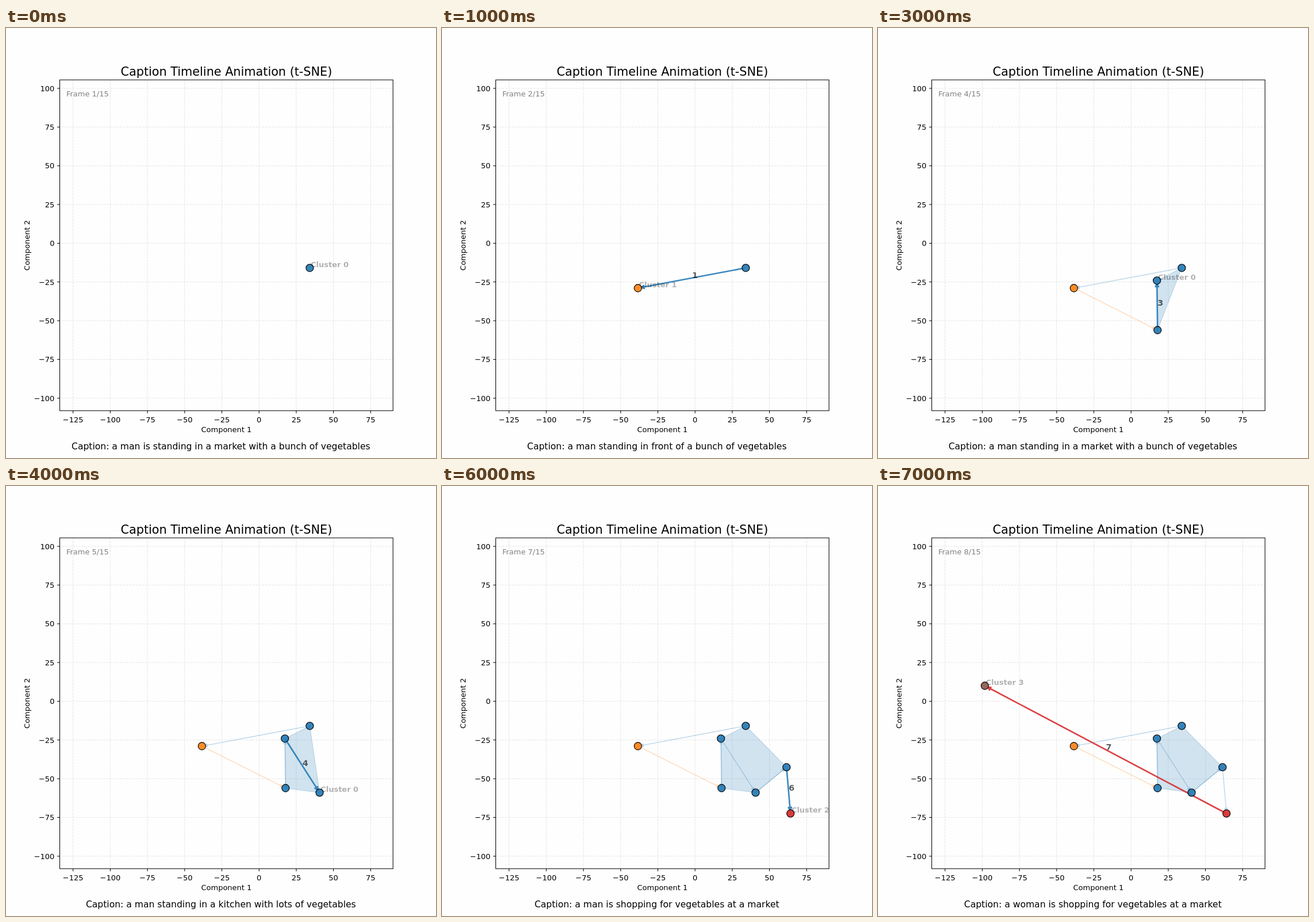
These frames come from a looping animation (748 by 748 pixels, 8 s). An HTML page:

```html
<!DOCTYPE html>
<html lang="en">
<head>
<meta charset="utf-8">
<title>Caption timeline</title>
<style>
  html, body { margin: 0; width: 100%; height: 100%; overflow: hidden; background: #fefefe; }
  svg { display: block; width: 748px; height: 748px; font: 12.99px "DejaVu Sans", sans-serif; }
</style>
</head>
<body>
<svg id="chart" viewBox="0 0 748 748">
  <g id="axes"></g>
  <g id="plot"></g>
</svg>
<script>
const STEP = 1000;
const PT = 1.2986; // pixels per typographic point
const BOX = { left: 93.5, right: 673.2, top: 90.3, bottom: 665.7 };
const COLORS = ['#1f77b4', '#ff7f0e', '#d62728', '#8c564b'];
const HULL_ORDER = [0, 5, 4, 2, 3];

// x, y, cluster, caption
const points = [
  [528.4, 417.3, 0, 'a man is standing in a market with a bunch of vegetables'],
  [340.8, 452.5, 1, 'a man standing in front of a bunch of vegetables'],
  [486.3, 525.5, 0, 'a man is standing in front of a bunch of vegetables'],
  [485.2, 439.3, 0, 'a man standing in a market with a bunch of vegetables'],
  [545.5, 533.4, 0, 'a man standing in a kitchen with lots of vegetables'],
  [599.3, 489.2, 0, 'a man in a kitchen preparing vegetables for sale'],
  [606.2, 569.7, 2, 'a man is shopping for vegetables at a market'],
  [185.8, 347.5, 3, 'a woman is shopping for vegetables at a market'],
].map(([x, y, cluster, caption]) => ({ x, y, color: COLORS[cluster], cluster, caption }));

const text = (x, y, str, attrs = '') => `<text x="${x}" y="${y}" ${attrs}>${str}</text>`;
const path = (d, attrs) => `<path d="${d}" ${attrs}/>`;
const middle = 'text-anchor="middle"';

function drawAxes() {
  let grid = '', ticks = '', labels = '';
  const minus = v => String(v).replace('-', '\u2212');
  for (let v = -125; v <= 75; v += 25) {
    const x = 440.2 + v * 2.5885;
    grid += `M${x} ${BOX.bottom}V${BOX.top}`;
    ticks += `M${x} ${BOX.bottom}v4.5`;
    labels += text(x, 685.5, minus(v), middle);
  }
  for (let v = -100; v <= 100; v += 25) {
    const y = 374.4 - v * 2.695;
    grid += `M${BOX.left} ${y}H${BOX.right}`;
    ticks += `M${BOX.left} ${y}h-4.5`;
    labels += text(84.4, y + 4.8, minus(v), 'text-anchor="end"');
  }
  const frame = `M${BOX.left} ${BOX.top}H${BOX.right}V${BOX.bottom}H${BOX.left}Z`;
  return path(grid, 'stroke="#b0b0b0" stroke-opacity=".3" stroke-width="1.04" stroke-dasharray="3.84 1.66"')
    + path(ticks + frame, 'fill="none" stroke="#000" stroke-width="1.04"')
    + labels
    + text(383.4, 83, 'Caption Timeline Animation (t-SNE)', `${middle} font-size="20.78"`)
    + text(383.4, 703.3, 'Component 1', middle)
    + text(0, 0, 'Component 2', `${middle} transform="translate(41 378) rotate(-90)"`);
}

function arrow(a, b, width, opacity) {
  const angle = Math.atan2(b.y - a.y, b.x - a.x) * 180 / Math.PI;
  const length = Math.hypot(b.x - a.x, b.y - a.y);
  const tip = length - 2 * PT - width * 1.12;
  const base = tip - 4 * PT, half = 2 * PT;
  return path(`M${2 * PT} 0H${base}M${tip} 0L${base} ${half}V${-half}Z`,
    `transform="translate(${a.x} ${a.y}) rotate(${angle})" fill="${a.color}" stroke="${a.color}"
     stroke-width="${width}" stroke-linejoin="round" opacity="${opacity}"`);
}

function hull(step) {
  const corners = HULL_ORDER.filter(i => i <= step).map(i => `${points[i].x} ${points[i].y}`);
  if (corners.length < 2) return '';
  const line = 'M' + corners.join('L');
  const color = COLORS[0];
  return corners.length === 2
    ? path(line, `stroke="${color}" stroke-width="${2 * PT}" stroke-opacity=".4"`)
    : path(line + 'Z', `fill="${color}" fill-opacity=".2" stroke="${color}" stroke-width="${PT}" stroke-opacity=".2"`);
}

function drawStep(step) {
  const now = points[step];
  let out = hull(step);
  for (let i = 1; i < step; i++) out += arrow(points[i - 1], points[i], PT, 0.3);
  if (step) {
    const from = points[step - 1];
    out += arrow(from, now, 2 * PT, 0.87)
      + text((from.x + now.x) / 2 + 5.4, (from.y + now.y) / 2 + 0.3, step,
        `${middle} font-size="14.28" font-weight="bold" fill-opacity=".63"`);
  }
  out += text(now.x + 1.7, now.y - 1.6, `Cluster ${now.cluster}`, 'font-weight="bold" fill-opacity=".3"');
  for (const p of points.slice(0, step + 1)) {
    out += `<circle cx="${p.x}" cy="${p.y}" r="6.5" fill="${p.color}" stroke="#000" stroke-width="${PT}" fill-opacity=".9" stroke-opacity=".9"/>`;
  }
  return out
    + text(105, 119, `Frame ${step + 1}/15`, 'fill="#808080"')
    + text(373.8, 733.2, `Caption: ${now.caption}`, `${middle} font-size="15.58"`);
}

const plot = document.getElementById('plot');
let shown = -1;

function tick() {
  const step = Math.floor(performance.now() / STEP) % points.length;
  if (step !== shown) {
    plot.innerHTML = drawStep(step);
    shown = step;
  }
  requestAnimationFrame(tick);
}

document.getElementById('axes').innerHTML = drawAxes();
tick();
</script>
</body>
</html>
```
